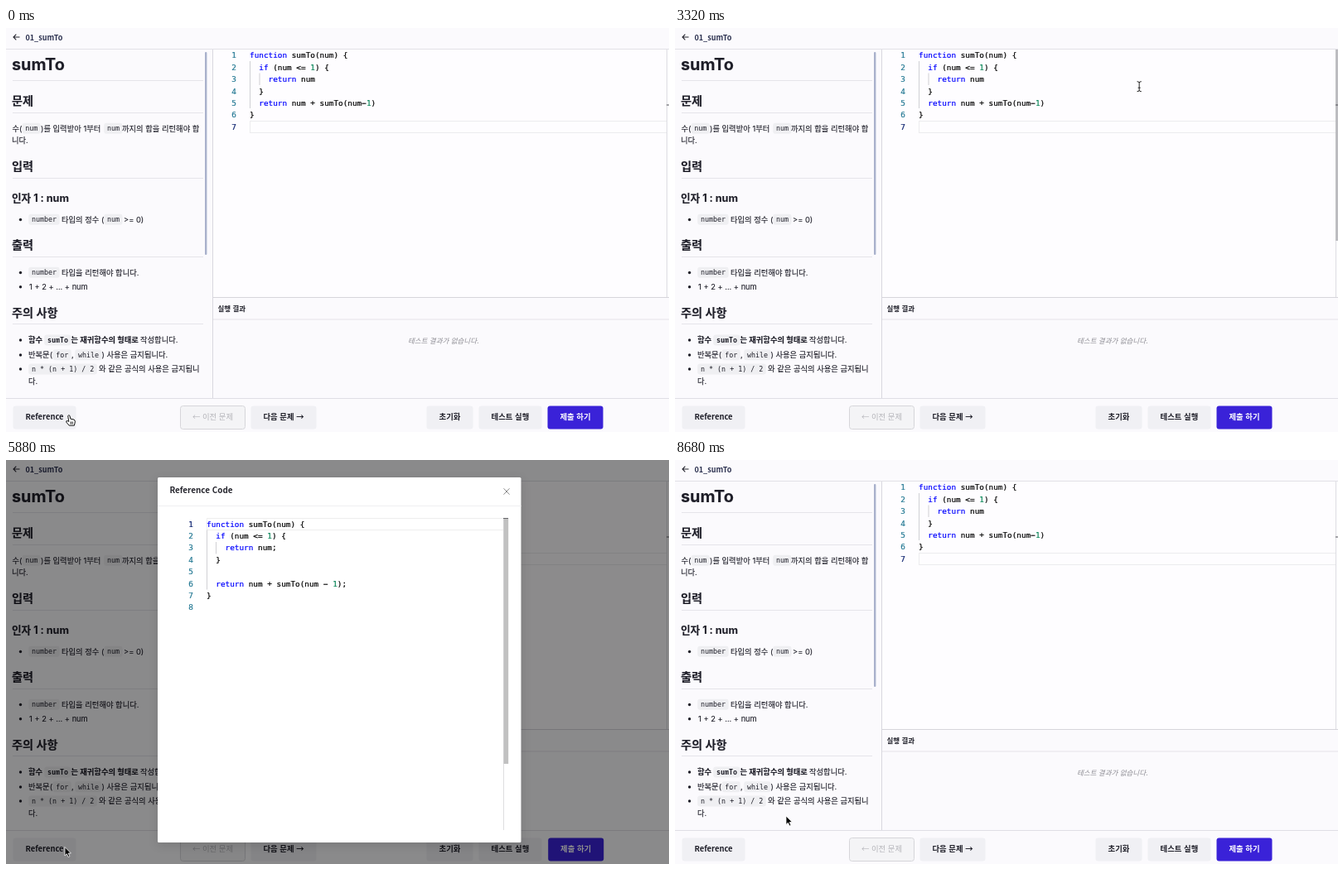
Write an HTML page that moves like this. It is 800 px wide and 488 px high and loops after 8720 ms.

```html
<!DOCTYPE html>
<html lang="ko">
<head>
<meta charset="utf-8">
<title>sumTo</title>
<style>
html, body { margin: 0; width: 100%; height: 100%; overflow: hidden; background: #fbfafd; }
svg { display: block; width: 800px; height: 488px; }
text { white-space: pre; fill: #1e1e28; }
.ui { font-family: "Noto Sans CJK KR", "Noto Sans CJK", sans-serif; }
.doc { font-family: Inter, "Noto Sans CJK KR", "Noto Sans CJK", sans-serif; stroke: #1e1e28; stroke-width: .12; }
.mono { font-family: "DejaVu Sans Mono", monospace; }
.code { fill: #000; stroke: #000; stroke-width: .2; }
.key { fill: #00f; stroke: #00f; }
.num { fill: #098658; stroke: #098658; }
.line { fill: #237893; stroke: #237893; stroke-width: .2; }
.active { fill: #0b216f; stroke: #0b216f; }
.sheet { filter: drop-shadow(0 3px 6px rgba(0,0,0,.12)); }
</style>
</head>
<body>
<svg id="stage" viewBox="0 0 800 488" xmlns="http://www.w3.org/2000/svg">
  <g id="page"></g>
  <rect id="mask" width="800" height="488" opacity="0"/>
  <g id="modal" class="sheet"></g>
  <g id="pointer">
    <path id="arrow" d="M0 0V10.4L2.4 8.2L4.1 12L5.9 11.2L4.2 7.5H7.4Z" stroke="#fff" stroke-width=".8"/>
    <path id="hand" d="M-1.3 1Q-.2-.6 1 .9L1.8 4.6L6 5.5Q7.5 6.1 7.3 8.4L6.4 12.6H.2L-3.2 8.6Q-3.8 6.7-1.6 7.1L-.2 8ZM2.2 8V11M4.2 8V11" fill="#fff" stroke="#111" stroke-width="1" stroke-linejoin="round"/>
    <path id="beam" d="M-2.6-6Q0-6 0-4.6Q0-6 2.6-6M-2.6 6Q0 6 0 4.6Q0 6 2.6 6M0-5V5M-1.5 1.5H1.5" fill="none" stroke="#222"/>
  </g>
</svg>
<script>
const $ = id => document.getElementById(id);
const LOOP = 8720, STEP = 40, FADE = 200;

// Markup helpers
const rect = (x, y, w, h, fill, more = '') =>
  `<rect x="${x}" y="${y}" width="${w}" height="${h}" fill="${fill}" ${more}/>`;
const text = (x, y, size, str, more = '', cls = 'ui') =>
  `<text class="${cls}" x="${x}" y="${y}" font-size="${size}" ${more}>${str}</text>`;
const BOLD = 'font-weight="700"';
const doc = (x, y, str, size = 9.3, more = '') => text(x, y, size, str, more, 'doc');
const rule = (x, y, w, fill = '#e5e4ea') => rect(x, y, w, 1, fill);
const dot = y => `<circle cx="17.5" cy="${y}" r="1.7" fill="#1e1e28"/>`;
const chip = (x, y, str, more = '') =>
  rect(x - 3.8, y - 9.6, str.length * 5.03 + 7.2, 13, '#efeff2', 'rx="3"') +
  text(x, y, 8.36, str, more, 'mono');
const heading = (y, str, size, under) =>
  doc(7, y, str, size, BOLD) + (under ? rule(8, under, 230) : '');

// The wide minus sign gives the long dash of the editor font.
const paint = line => line.replace(/</g, '&lt;').replace(/-/g, '−')
  .replace(/\b(function|if|return)\b/g, '<tspan class="key">$1</tspan>')
  .replace(/\b1\b/g, '<tspan class="num">1</tspan>');

function code(x, y, lines, active, guides) {
  const rows = lines.map((line, i) => {
    const by = y + i * 14.4;
    return text(x - 16, by, 9.37, i + 1, 'text-anchor="end"',
        `mono line ${i === active ? 'active' : ''}`) +
      text(x, by, 9.37, paint(line), '', 'mono code');
  });
  return guides.map(([gx, gy, h]) => rect(gx, gy, 1, h, '#d0d0d4')).join('') + rows.join('');
}

function button(x, w, label, opt = {}) {
  const { fill = '#f0f0f4', ink = '#1e1e28', edge = 'none', weight = 700 } = opt;
  return rect(x + .5, 456.5, w - 1, 28, fill, `rx="3" stroke="${edge}"`) +
    text(x + w / 2, 473.3, 9.4, label,
      `text-anchor="middle" font-weight="${weight}" style="fill:${ink}"`);
}

const editorCode = ['function sumTo(num) {', '  if (num <= 1) {', '    return num', '  }',
  '  return num + sumTo(num-1)', '}', ''];
const referenceCode = ['function sumTo(num) {', '  if (num <= 1) {', '    return num;', '  }', '',
  '  return num + sumTo(num - 1);', '}', ''];

$('page').innerHTML = [
  rect(0, 0, 800, 488, '#fbfafd'),
  rect(250, 26, 550, 299, '#fefdff'),
  rule(0, 25, 800, '#e2e1e7'),
  '<path d="M16.5 11H9M12.3 7.7L9 11L12.3 14.3" fill="none" stroke="#24242e" stroke-width="1.1"/>',
  text(23.5, 14.5, 9, '01_sumTo', `${BOLD} style="fill:#2c3150"`),

  heading(51, 'sumTo', 19.8, 63),
  heading(92.5, '문제', 14.2, 102),
  doc(7.5, 124.5, '수('), chip(23.3, 124.3, 'num'), doc(42, 124.5, ')를 입력받아 1부터'),
  chip(122, 124.3, 'num'), doc(140, 124.5, '까지의 합을 리턴해야 합'), doc(7, 139, '니다.'),
  heading(172, '입력', 14.2, 181),
  heading(209.5, '인자 1 : num', 12.6),
  dot(231.5), chip(31, 234.3, 'number'), doc(67, 234.5, '타입의 정수 ('),
  chip(122, 234.3, 'num'), doc(142, 234.5, '&gt;= 0)'),
  heading(267, '출력', 14.2, 276),
  dot(295.5), chip(31, 298.3, 'number'), doc(67, 298.5, '타입을 리턴해야 합니다.'),
  dot(312.7), doc(28, 316, '1 + 2 + ... + num'),
  heading(348.5, '주의 사항', 14.2, 357),
  dot(377), doc(27, 380, '함수', 9.3, BOLD), chip(50, 380, 'sumTo', BOLD),
  doc(78.5, 380, '는 재귀함수의 형태로', 9.3, BOLD), doc(162, 380, '작성합니다.'),
  dot(395), doc(27, 398, '반복문('), chip(60.3, 397.8, 'for'), doc(79, 398, ','),
  chip(87, 397.8, 'while'), doc(115.5, 398, ') 사용은 금지됩니다.'),
  dot(412), chip(31, 415, 'n * (n + 1) / 2'), doc(112, 415, '와 같은 공식의 사용은 금지됩니'),
  doc(27, 430, '다.'),
  rect(240, 29, 2.4, 245, '#a9b1cc', 'rx="1"'),
  rect(249, 26, 1, 421, '#d9d8df'),

  rect(294.5, 112.5, 503, 14, 'none', 'stroke="#ececee"'),
  rect(797, 26, 1, 299, '#dddde2'),
  '<rect id="slider" x="797" y="26" width="3" height="231" fill="#bcbcc0"/>',
  rect(797, 92.5, 3, 1, '#55555a'),
  code(294, 36.3, editorCode, 6, [[294, 40, 57], [305.5, 54.5, 14.5]]),

  rule(250, 325, 550, '#d6d5db'),
  text(255.5, 341.7, 8.5, '실행 결과', BOLD),
  rule(250, 351.5, 550),
  text(485, 380.5, 8.5, '테스트 결과가 없습니다.', 'font-style="italic" style="fill:#8e8d94"'),

  rule(0, 447, 800, '#dfdee5'),
  button(8, 77, 'Reference'),
  button(210, 79, '← 이전 문제', { fill: '#f4f4f6', ink: '#b5b5ba', edge: '#d6d6da', weight: 400 }),
  button(295, 80, '다음 문제 →'),
  button(507, 57, '초기화'),
  button(570, 77, '테스트 실행'),
  '<g id="submit">', button(653, 68, '제출 하기', { fill: '#3a22d8', ink: '#fff' }), '</g>'
].join('');

$('modal').innerHTML = [
  rect(183, 21, 438.5, 441, '#fff', 'rx="1.5"'),
  text(197.5, 40.3, 9.9, 'Reference Code', `${BOLD} style="fill:#26262e"`),
  '<path id="close" d="M600.5 34.3L607.5 41.7M607.5 34.3L600.5 41.7" stroke="#8c8c8c" stroke-width="1"/>',
  rule(183, 55, 438.5, '#efeff1'),
  rect(242.5, 70.5, 363, 14, 'none', 'stroke="#eeeeee"'),
  rect(600, 70, 1, 377, '#dedee0'),
  '<rect id="bar" x="600.5" y="70" width="5.7" height="297" fill="#c1c1c1"/>',
  rect(600, 70, 6, 1, '#66666a'),
  code(242, 80.6, referenceCode, 0, [[242, 84.5, 72], [253, 99, 14.4]])
].join('');

// Timing
const clamp = v => Math.min(1, Math.max(0, v));
const mix = (a, b, k) => a + (b - a) * k;

function bezier(x1, y1, x2, y2) {
  const at = (a, b, s) => 3 * a * s * (1 - s) ** 2 + 3 * b * s * s * (1 - s) + s ** 3;
  return x => {
    if (x <= 0 || x >= 1) return clamp(x);
    let lo = 0, hi = 1;
    for (let i = 0; i < 24; i++) {
      const mid = (lo + hi) / 2;
      if (at(x1, x2, mid) < x) lo = mid; else hi = mid;
    }
    return at(y1, y2, lo);
  };
}
const zoomIn = bezier(.08, .82, .17, 1);
const zoomOut = bezier(.78, .14, .15, .86);
const glide = bezier(.42, 0, .4, 1);

const shows = [
  { mask: 800, open: 852, close: 2900, x: 74, y: 470 },
  { mask: 4908, open: 4960, close: 7005, x: 69, y: 472 }
];

// Pointer stops: time, x, y
const stops = [
  [0, 76, 467.5], [1440, 76, 467.5], [2200, 590.5, 53], [3160, 590.5, 53],
  [3800, 398, 165.3], [4140, 398, 165.3], [4760, 71, 467.5],
  [6040, 71, 467.5], [6640, 134, 430], [LOOP, 134, 430]
];

function pointerAt(t) {
  const i = stops.findIndex((s, n) => n && t <= s[0]);
  const [t0, x0, y0] = stops[i - 1], [t1, x1, y1] = stops[i];
  const k = glide((t - t0) / (t1 - t0));
  return [mix(x0, x1, k), mix(y0, y1, k)];
}

const inside = (x, y, l, t, r, b) => x >= l && x < r && y >= t && y < b;

function draw(t) {
  const show = shows.find(s => t >= s.mask && t < s.close + FADE);
  let dim = 0, zoom = 0;
  if (show) {
    const out = (t - show.close) / FADE;
    dim = clamp((t - show.mask) / FADE) * (1 - clamp(out));
    zoom = zoomIn((t - show.open) / FADE) * (1 - zoomOut(out));
    const scale = mix(.2, 1, zoom);
    $('modal').setAttribute('transform',
      `translate(${show.x} ${show.y}) scale(${scale}) translate(${-show.x} ${-show.y})`);
  }
  $('mask').setAttribute('opacity', .45 * dim);
  $('modal').setAttribute('opacity', zoom);
  $('modal').setAttribute('display', zoom ? 'inline' : 'none');
  $('submit').setAttribute('transform', `translate(${dim ? .7 : 0} 0)`);

  const [x, y] = pointerAt(t);
  const onClose = !!show && inside(x, y, 574, 21, 621, 68);
  const onEditor = !show && inside(x, y, 250, 26, 800, 325);
  const onCode = !!show && inside(x, y, 242, 70, 600, 447);
  const onButton = !show && inside(x, y, 8, 456, 85, 485);
  const kind = onClose || onButton ? 'hand' : onEditor || onCode ? 'beam' : 'arrow';
  for (const id of ['arrow', 'hand', 'beam'])
    $(id).setAttribute('display', id === kind ? 'inline' : 'none');
  $('pointer').setAttribute('transform', `translate(${x} ${y})`);
  $('slider').setAttribute('opacity', onEditor ? 1 : 0);
  $('bar').setAttribute('opacity', 1 - clamp((t - 6100) / 600));
  $('close').setAttribute('stroke', onClose ? '#5a5a5a' : '#8c8c8c');
}

const start = performance.now();
function tick() {
  const t = (performance.now() - start) % LOOP;
  draw(t - t % STEP);
  requestAnimationFrame(tick);
}
tick();
</script>
</body>
</html>
```
